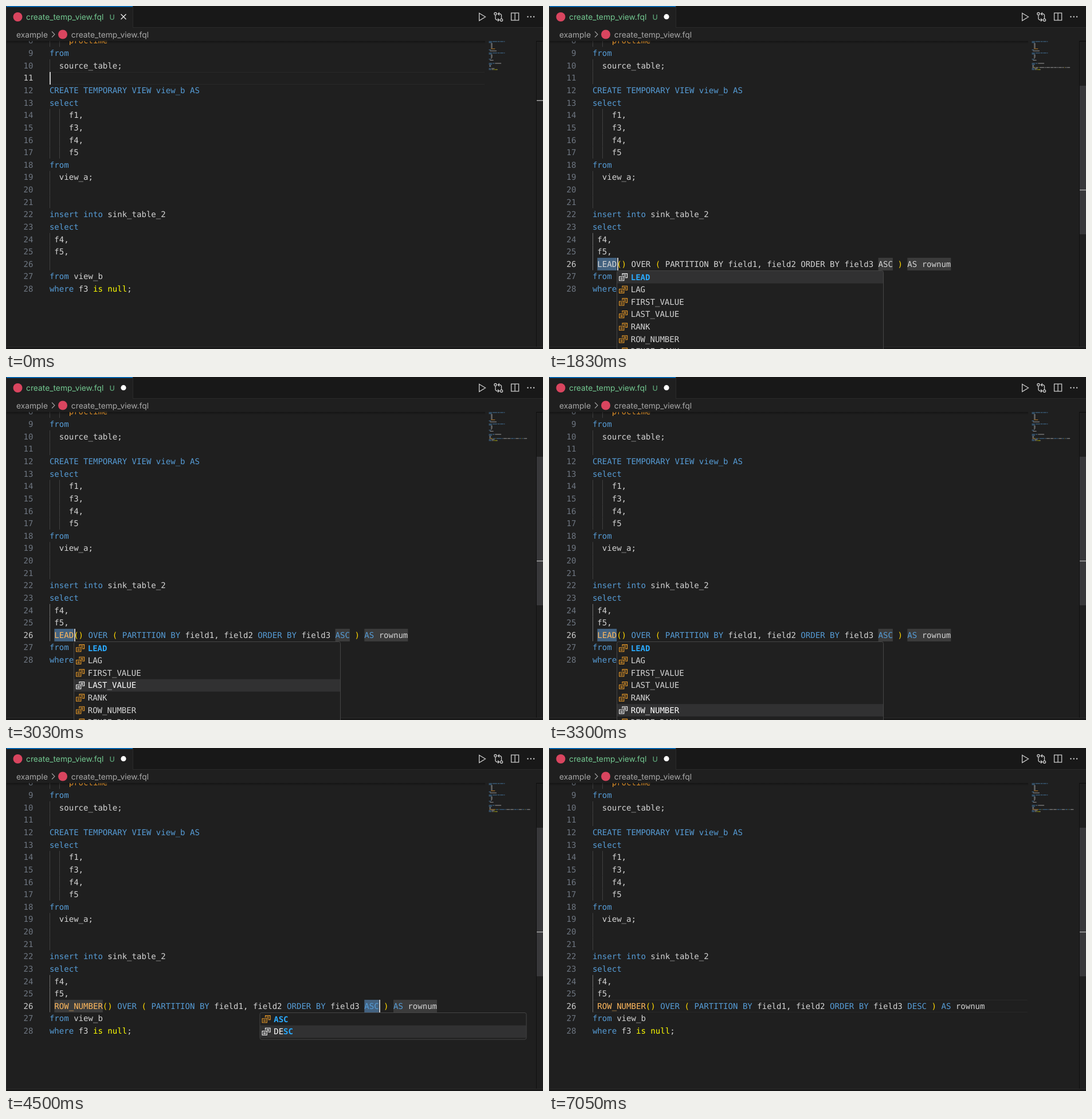
Animation of 937x598 px, one loop 7.26 s. Source, as an HTML page with a canvas:

```html
<!DOCTYPE html>
<html lang="en">
<head>
<meta charset="utf-8">
<title>Editor completion</title>
<style>
html, body { margin: 0; width: 100%; height: 100%; overflow: hidden; background: #1f1f1f; }
canvas { display: block; width: 937px; height: 598px; }
</style>
</head>
<body>
<canvas id="stage"></canvas>
<script>
const W = 937, H = 598, LOOP = 7260, BLINK = 450;
const canvas = document.getElementById('stage');
const ctx = canvas.getContext('2d');
const dpr = window.devicePixelRatio || 1;
canvas.width = W * dpr;
canvas.height = H * dpr;

const MONO = '"DejaVu Sans Mono", monospace';
const UI = 'Inter, sans-serif';
const CODE = '14.04px ' + MONO;
const X0 = 75.9, ADV = 8.452, ROW = 21.63;
const BG = '#1f1f1f', BLUE = '#569cd6', TEXT = '#d4d4d4', GOLD = '#ffd700';
const ORANGE = '#ffb95e', MATCH = '#2aaaff', ICON = '#ee9d28';

const LINES = [
  'CREATE TEMPORARY VIEW view_a AS', 'select',
  '    f1,', '    f2,', '    f3,', '    f4,', '    f5,', '    proctime',
  'from', '  source_table;', '',
  'CREATE TEMPORARY VIEW view_b AS', 'select',
  '    f1,', '    f3,', '    f4,', '    f5',
  'from', '  view_a;', '', '',
  'insert into sink_table_2', 'select', ' f4,', ' f5,', ' ',
  'from view_b', 'where f3 is null;'
];
const EDITED = 26;
const KEYWORDS = new Set('select from insert into where OVER PARTITION BY ORDER AS ASC DESC'.split(' '));
const FUNCS = ['LEAD', 'LAG', 'FIRST_VALUE', 'LAST_VALUE', 'RANK', 'ROW_NUMBER', 'DENSE_RANK'];

const lineTop = n => 439 + (n - EDITED) * ROW;
const colX = c => X0 + c * ADV;

function rect(x, y, w, h, color) {
  ctx.fillStyle = color;
  ctx.fillRect(x, y, w, h);
}

function text(s, x, y, color, font = CODE) {
  ctx.font = font;
  ctx.fillStyle = color;
  ctx.fillText(s, x, y);
}

function stroke(color, width, draw) {
  ctx.strokeStyle = color;
  ctx.lineWidth = width;
  ctx.beginPath();
  draw();
  ctx.stroke();
}

function poly(...p) {
  ctx.moveTo(p[0], p[1]);
  for (let i = 2; i < p.length; i += 2) ctx.lineTo(p[i], p[i + 1]);
}

function disc(x, y, r, color) {
  ctx.fillStyle = color;
  ctx.beginPath();
  ctx.arc(x, y, r, 0, Math.PI * 2);
  ctx.fill();
}

// Last entry of [time, value] pairs whose time has passed.
function at(t, steps) {
  let value = steps[0][1];
  for (const [time, v] of steps) if (t >= time) value = v;
  return value;
}

function snippet(fn, dir) {
  return ` ${fn}() OVER ( PARTITION BY field1, field2 ORDER BY field3 ${dir} ) AS rownum`;
}

function stateAt(t) {
  const s = { line: EDITED, col: 1, code: ' ', spans: [], active: -1, popup: null, plain: false, plainFn: false };
  const reset = at(t, [[0, 0], [270, 270], [1140, 1140], [1230, 1230], [1410, 1410],
    [1830, 1800], [3600, 3600], [4590, 4590], [5700, 5700]]);
  s.caret = Math.floor((t - reset) / BLINK) % 2 === 0;
  s.slider = Math.min(1, Math.max(0, (t - 30) / 180));
  s.dirty = t >= 1140;

  if (t < 270) {
    s.line = 11;
    s.col = 0;
  } else if (t >= 1140 && t < 1830) {
    const typed = at(t, [[1140, 'w'], [1230, 'wi'], [1410, 'win']]);
    s.code = ' ' + typed;
    s.col = 1 + typed.length;
    const windows = { label: 'windows', hit: [0, typed.length], kind: 'snippet', detail: 'Windows' };
    const where = { label: 'where', hit: [0, 1], kind: 'word' };
    if (t >= 1170) s.popup = { x: 93, selected: 0, items: typed === 'w' ? [where, windows] : [windows] };
  } else if (t >= 1830) {
    const fn = t < 3600 ? 'LEAD' : 'ROW_NUMBER';
    const dir = t < 4590 ? 'ASC' : 'DESC';
    s.code = snippet(fn, dir);
    s.plain = t < 1890;
    s.plainFn = t >= 3600 && t < 3690;
    s.col = s.code.length;
    if (t < 5700) {
      const dirAt = s.code.indexOf(' ' + dir + ' )') + 1;
      s.spans = [[1, 1 + fn.length], [dirAt, dirAt + dir.length], [s.code.length - 9, s.code.length]];
      s.active = t < 3600 ? 0 : t < 4590 ? 1 : 2;
      s.col = s.spans[s.active][1];
      s.popup = choices(t, s.active);
    }
  }
  return s;
}

function choices(t, stop) {
  if (stop === 0) {
    return {
      x: 118,
      selected: at(t, [[0, 0], [2700, 1], [2850, 2], [3000, 3], [3150, 4], [3300, 5]]),
      items: FUNCS.map(label => ({ label, hit: label === 'LEAD' ? [0, 4] : [0, 0] }))
    };
  }
  if (stop === 1) {
    return {
      x: 442.5, selected: t < 4380 ? 0 : 1,
      items: [{ label: 'ASC', hit: [0, 3] }, { label: 'DESC', hit: [2, 4] }]
    };
  }
  return { x: 442.5, selected: 0, items: [{ label: 'AS rownum', hit: [0, 9] }] };
}

function tokens(line, s, edited) {
  const list = [];
  for (const m of line.matchAll(/[A-Za-z_]\w*|[^\sA-Za-z_]/g)) {
    const word = m[0];
    let color = TEXT;
    if (line.startsWith('CREATE')) color = BLUE;
    else if (word === '(' || word === ')') color = GOLD;
    else if (edited && s.plain) color = TEXT;
    else if (KEYWORDS.has(word)) color = BLUE;
    else if (word === 'is' || word === 'null') color = '#ffff00';
    else if (word === 'proctime') color = '#ffa52e';
    else if (FUNCS.includes(word) && !s.plainFn) color = ORANGE;
    list.push({ word, color, col: m.index });
  }
  return list;
}

function guides(n) {
  const inBlock = (a, b) => n >= a && n <= b;
  if (inBlock(3, 8) || inBlock(14, 17)) return [0, 2];
  return inBlock(10, 11) || inBlock(19, 21) || inBlock(24, 26) ? [0] : [];
}

function drawCode(s) {
  ctx.save();
  ctx.beginPath();
  ctx.rect(0, 61, W, 533);
  ctx.clip();

  if (s.active < 0) {
    const y = Math.round(lineTop(s.line));
    rect(77, y, 758, 1, '#282828');
    rect(77, y + 21, 758, 1, '#282828');
  }
  s.spans.forEach(([a, b], i) => {
    rect(colX(a), 439, (b - a) * ADV, 22, i === s.active ? '#436280' : '#3b3b3b');
  });

  for (let n = 8; n <= 28; n++) {
    const top = lineTop(n), base = top + 15.8;
    for (const c of guides(n)) {
      const lit = c === 0 && s.line === EDITED && n >= 24 && n <= 26;
      rect(Math.round(colX(c)), top, 1, ROW, lit ? '#707070' : '#404040');
    }
    text(String(n), 47.5 - String(n).length * ADV, base, n === s.line ? '#cccccc' : '#6e7681');
    const edited = n === EDITED;
    for (const k of tokens(edited ? s.code : LINES[n - 1], s, edited)) {
      text(k.word, colX(k.col), base, k.color);
    }
  }
  if (s.active === 2) disc(colX(s.col - 6.5), 450.5, 0.9, '#8a959f');
  if (s.caret) rect(Math.round(76.4 + s.col * 8.45), Math.round(lineTop(s.line)), 2, 22, '#c8c8c8');

  const shade = ctx.createLinearGradient(0, 61, 0, 66);
  shade.addColorStop(0, 'rgba(0,0,0,.35)');
  shade.addColorStop(1, 'rgba(0,0,0,0)');
  rect(0, 61, 836, 5, shade);
  ctx.restore();
}

function drawMinimap(s) {
  ctx.globalAlpha = 0.6;
  LINES.forEach((line, i) => {
    const edited = i + 1 === EDITED;
    for (const k of tokens(edited ? s.code : line, s, edited)) {
      rect(842.5 + k.col * 0.9, 61.4 + i * 1.81, k.word.length * 0.9, 1.15, k.color);
    }
  });
  ctx.globalAlpha = 1;
}

function drawRuler(s) {
  rect(925, 61, 1, 533, '#101010');
  rect(925, 61, 12, 1, '#0c0c0c');
  ctx.globalAlpha = s.slider;
  rect(926, 139, 11, 259, '#38383a');
  ctx.globalAlpha = 1;
  rect(926, s.line === 11 ? 164 : 320, 11, 1.5, '#a5a5a5');
}

function drawHeader(s) {
  rect(221, 0, W - 221, 37, '#181818');
  rect(221, 0, 1, 37, '#2b2b2b');
  rect(221, 37, W - 221, 1, '#2b2b2b');
  rect(0, 0, 221, 1.5, '#0078d4');

  disc(20.5, 19, 8, '#d9455f');
  text('create_temp_view.fql', 35, 24, '#73c991', '13.8px ' + UI);
  text('U', 180.5, 23.5, '#5ba377', '500 12.5px ' + UI);
  if (s.dirty) disc(205, 18.7, 4.6, '#ffffff');
  else stroke('#e8e8e8', 1.4, () => { poly(200.5, 14.2, 209.5, 23.2); poly(209.5, 14.2, 200.5, 23.2); });

  text('example', 18, 54.7, '#a9a9a9', '13.8px ' + UI);
  stroke('#a0a0a0', 1.1, () => poly(80, 44.5, 85, 49.5, 80, 54.5));
  disc(99, 49.5, 8, '#d9455f');
  text('create_temp_view.fql', 113.8, 54.7, '#a9a9a9', '13.8px ' + UI);

  stroke('#cccccc', 1.3, () => {
    poly(825.7, 12.5, 836.5, 19, 825.7, 25.5);
    ctx.closePath();
    // branch compare
    poly(854, 16, 854, 22.5, 856, 24.3, 860, 24.3);
    poly(858, 21.8, 860.6, 24.3, 858, 26.8);
    poly(864.5, 22, 864.5, 15.5, 862.5, 13.7, 858.5, 13.7);
    poly(861, 11.2, 858.4, 13.7, 861, 16.2);
    ctx.moveTo(856.1, 13.6);
    ctx.arc(854, 13.6, 2.1, 0, Math.PI * 2);
    ctx.moveTo(866.6, 24.4);
    ctx.arc(864.5, 24.4, 2.1, 0, Math.PI * 2);
    // split view
    ctx.rect(881.6, 12.2, 13, 12.6);
    poly(888.1, 12.2, 888.1, 24.8);
  });
  for (const x of [910.5, 915.8, 921.1]) disc(x, 18.8, 1.2, '#cccccc');
}

function drawIcon(kind, x, mid, selected) {
  if (kind === 'word') {
    text('abc', x + 3.8, mid + 3.5, '#e0e0e0', '10px ' + UI);
    return;
  }
  if (kind === 'snippet') {
    const color = selected ? '#ffffff' : '#cccccc';
    stroke(color, 1.1, () => poly(x + 5.5, mid + 7, x + 5.5, mid - 6.5, x + 18.5, mid - 6.5, x + 18.5, mid + 7));
    ctx.setLineDash([1.5, 1.5]);
    stroke(color, 1.1, () => poly(x + 5.5, mid + 6.8, x + 18.5, mid + 6.8));
    ctx.setLineDash([]);
    return;
  }
  const color = selected ? '#ffffff' : ICON;
  stroke(color, 1.1, () => {
    ctx.rect(x + 4.6, mid - 0.8, 8.2, 7);
    poly(x + 6.6, mid + 1.7, x + 10.8, mid + 1.7);
    poly(x + 6.6, mid + 3.9, x + 10.8, mid + 3.9);
    poly(x + 10, mid - 2.6, x + 10, mid - 6, x + 18.6, mid - 6, x + 18.6, mid + 1, x + 14.8, mid + 1);
    poly(x + 12, mid - 3.6, x + 16.6, mid - 3.6);
    poly(x + 13.5, mid - 1.4, x + 16.6, mid - 1.4);
  });
}

function drawPopup({ x, items, selected }) {
  const top = 461, width = 466, height = items.length * ROW + 4.4;
  ctx.fillStyle = '#202020';
  ctx.beginPath();
  ctx.roundRect(x + 0.5, top + 0.5, width - 1, height - 1, 3);
  ctx.fill();
  items.forEach((item, i) => {
    const y = top + 1 + i * ROW, mid = y + 10.6, on = i === selected;
    if (on) rect(x + 1, y, width - 2, ROW, '#313132');
    drawIcon(item.kind, x, mid, on);
    const [a, b] = item.hit;
    const parts = [[0, a, false], [a, b, true], [b, item.label.length, false]];
    for (const [from, to, hit] of parts) {
      const color = hit ? MATCH : on ? '#ffffff' : TEXT;
      text(item.label.slice(from, to), x + 24.7 + from * ADV, mid + 4.9, color, (hit ? 'bold ' : '') + CODE);
    }
    if (item.detail) text(item.detail, x + 403.7, mid + 4.2, '#a0a0a0', '12px ' + MONO);
  });
  stroke('#454545', 1, () => ctx.roundRect(x + 0.5, top + 0.5, width - 1, height - 1, 3));
}

function draw(t) {
  const s = stateAt(t);
  ctx.setTransform(dpr, 0, 0, dpr, 0, 0);
  ctx.textRendering = 'geometricPrecision';
  rect(0, 0, W, H, BG);
  drawCode(s);
  drawMinimap(s);
  drawRuler(s);
  drawHeader(s);
  rect(0, 594, W, 4, '#181818');
  rect(0, 594, W, 1, '#2b2b2b');
  rect(0, 0, 1, H, '#2b2b2b');
  if (s.popup) drawPopup(s.popup);
}

const start = performance.now();
function tick() {
  draw((performance.now() - start) % LOOP);
  requestAnimationFrame(tick);
}
tick();
</script>
</body>
</html>
```
